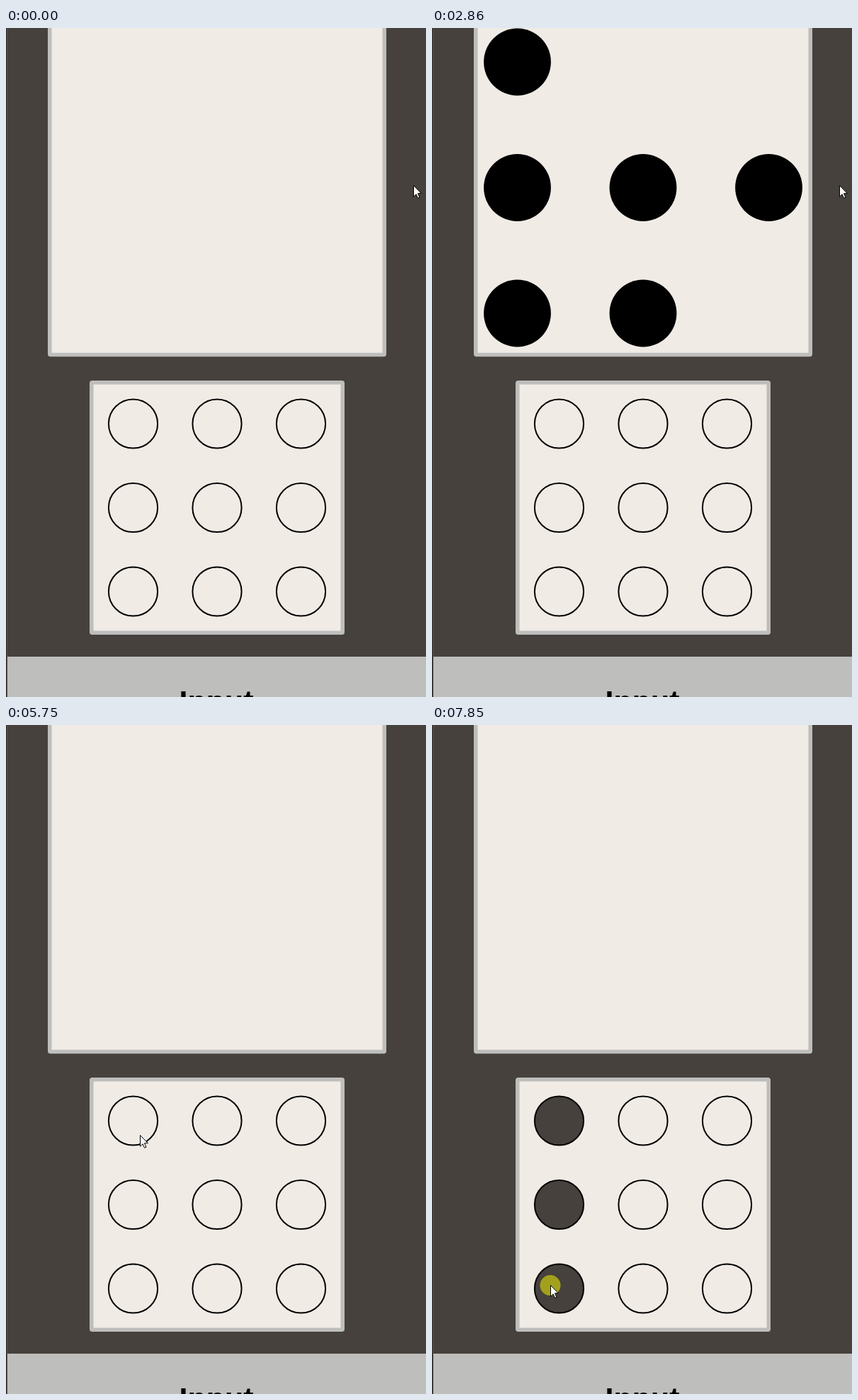
An HTML page that plays this animation: 593x945 px, repeating every 8 s.

```html
<!DOCTYPE html>
<html lang="en">
<head>
<meta charset="utf-8">
<title>Pattern input</title>
<style>
  html, body { margin: 0; width: 100%; height: 100%; overflow: hidden; background: #46413c; }
  svg { display: block; }
  text { font: bold 43px "Liberation Sans", Arial, sans-serif; text-anchor: middle; }
  .panel { fill: #f0ebe5; stroke: #bebebc; stroke-width: 5.5; }
  .key { stroke: #000; stroke-width: 2; }
</style>
</head>
<body>
<svg width="593" height="945" viewBox="0 0 593 945">
  <rect width="593" height="945" fill="#46413c"/>
  <rect class="panel" x="61.75" y="-20" width="472.5" height="481.5" rx="1"/>
  <rect class="panel" x="120.75" y="500.75" width="354.5" height="353.5" rx="1"/>
  <g id="dots"></g>
  <g id="keys"></g>
  <rect y="888" width="593" height="57" fill="#bebebc"/>
  <text x="297" y="966">Input</text>
  <rect width="1" height="945" fill="#292826"/>
  <rect x="1" width="1" height="945" fill="#56534f"/>
  <circle id="spot" r="14.5" fill="#ff0" fill-opacity=".5"/>
  <path id="cursor" d="M.5 .5V16.2L4.1 12.8L6.5 18.3L8.9 17.3L6.5 11.7H11.3Z"
        fill="#fff" stroke="#000"/>
</svg>
<script>
const LOOP = 8000;
const $ = id => document.getElementById(id);

function makeGrid(parent, x0, y0, pitch, attrs) {
  return Array.from({ length: 9 }, (_, i) => {
    const circle = document.createElementNS("http://www.w3.org/2000/svg", "circle");
    const all = { cx: x0 + (i % 3) * pitch, cy: y0 + Math.floor(i / 3) * pitch, ...attrs };
    for (const name in all) circle.setAttribute(name, all[name]);
    return parent.appendChild(circle);
  });
}

const dots = makeGrid($("dots"), 120.5, 48, 177.5, { r: 47.4 });
const keys = makeGrid($("keys"), 179.5, 559, 118.5, { r: 34.6, class: "key" });

// Each digit is the number of filled dots in its row
const patterns = ["123", "321", "132"];
const PATTERN_START = 880;
const PATTERN_TIME = 990;

// One press per row of the first key column
const presses = [
  { down: 6370, fill: 6450, up: 6630 },
  { down: 7100, fill: 7100, up: 7430 },
  { down: 7850, fill: 7850, up: LOOP }
];

const linear = u => u;
const easeOut = u => 1 - (1 - u) ** 1.5;
const easeInOut = u => u * u * (3 - 2 * u);

// Bezier strokes of the pointer, each starting where the last one ended
const home = [575, 222];
const strokes = [
  { at: 4580, step: 70, count: 11, ease: easeInOut, bend: [[540, 90], [205, 455]], to: [304, 468] },
  { at: 5540, step: 70, count: 9, ease: easeOut, bend: [[237, 503], [150, 650]], to: [159, 580] },
  { at: 6700, step: 70, count: 3, ease: linear, bend: [[170, 600], [185, 640]], to: [167, 658] },
  { at: 7520, step: 90, count: 3, ease: linear, bend: [[175, 700], [188, 755]], to: [167, 791] }
];

function bezier(a, b, c, d, u) {
  const v = 1 - u;
  return a.map((_, i) => Math.round(
    v ** 3 * a[i] + 3 * v * v * u * b[i] + 3 * v * u * u * c[i] + u ** 3 * d[i]));
}

function pointerAt(t) {
  let point = home;
  for (const { at, step, count, ease, bend, to } of strokes) {
    if (t < at) break;
    const done = Math.min(count, Math.floor((t - at) / step) + 1);
    point = bezier(point, ...bend, to, ease(done / count));
  }
  return point;
}

const show = (node, on) => node.setAttribute("visibility", on ? "visible" : "hidden");
const place = (node, x, y) => node.setAttribute("transform", `translate(${x} ${y})`);

function draw(t) {
  const rows = patterns[Math.floor((t - PATTERN_START) / PATTERN_TIME)] || "000";
  dots.forEach((dot, i) => show(dot, i % 3 < rows[Math.floor(i / 3)]));

  keys.forEach((key, i) => {
    const filled = i % 3 === 0 && t >= presses[i / 3].fill;
    key.setAttribute("fill", filled ? "#46413c" : "none");
  });

  const [x, y] = pointerAt(t);
  show($("spot"), presses.some(press => t >= press.down && t < press.up));
  place($("spot"), x, y + 0.5);
  place($("cursor"), x, y);
}

const start = performance.now();
function tick() {
  draw((performance.now() - start) % LOOP);
  requestAnimationFrame(tick);
}
tick();
</script>
</body>
</html>
```
